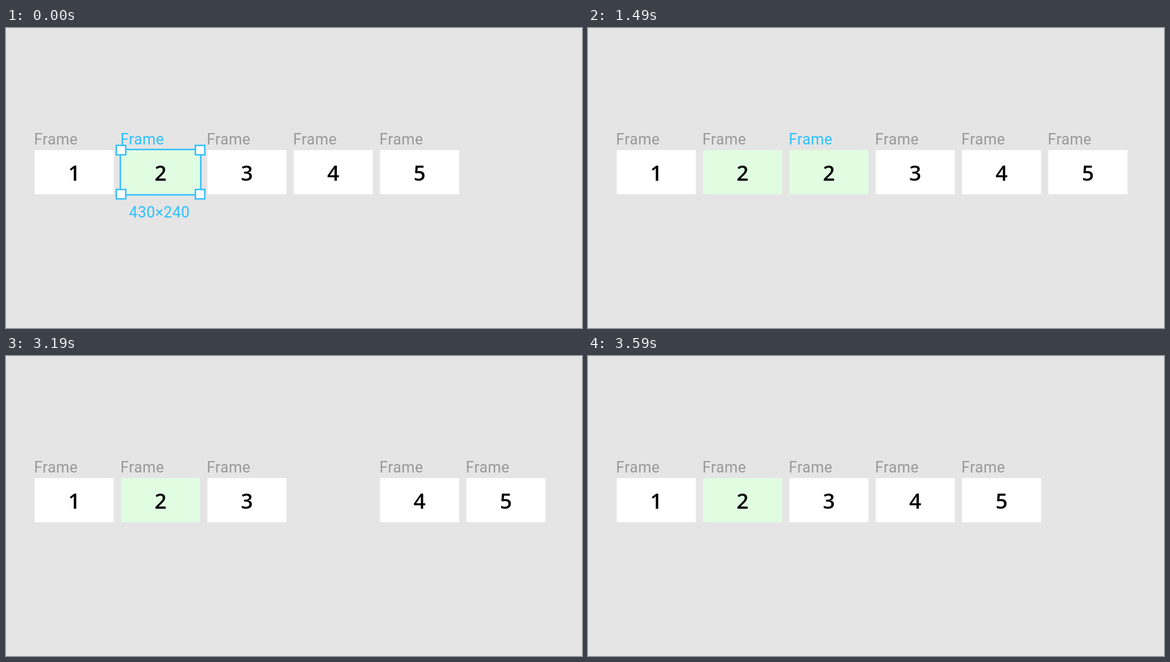
Recreate the animation shown at these times as an HTML page. Size 954 px wide and 497 px high, loop 4450 ms.

```html
<!DOCTYPE html>
<html lang="en">
<head>
<meta charset="utf-8">
<title>Frames</title>
<style>
  html, body { margin: 0; width: 100%; height: 100%; overflow: hidden; background: #e5e5e5; }
  svg { display: block; }
  .label, .size { font: 25px Roboto, sans-serif; letter-spacing: .45px; fill: #999; }
  .digit { font: 600 35px "Open Sans", "Noto Sans", sans-serif; text-anchor: middle; }
  .hot, .size { fill: #30bfff; }
  .line { fill: none; stroke: #30bfff; stroke-width: 2.4; }
  .handle { fill: #fff; }
</style>
</head>
<body>
<svg id="stage" width="954" height="497"></svg>
<script>
const LOOP = 4450, LEFT = 47.5, TOP = 202.3, PITCH = 143, W = 131, H = 73;

// start time, digit in each slot, slot with a blue label, outline shown
const steps = [
  [0, "12345", 1, true],
  [930, "12345"],
  [1010, "12345", 2],
  [1090, "12345"],
  [1170, "12345", 3],
  [1250, "12345"],
  [1330, "12345", 4],
  [1490, "122345", 2],
  [2960, "122345", 2, true],
  [3040, "12 345"],
  [3110, "12 345", 3, true],
  [3190, "123 45"],
  [3270, "123 45", 4],
  [3340, "1234 5"],
  [3420, "1234 5", 5],
  [3510, "12345", 4],
  [3590, "12345"]
];

const slotX = i => LEFT + PITCH * i;
const rect = (x, y, w, h, attrs) =>
  `<rect x="${x}" y="${y}" width="${w}" height="${h}" ${attrs}/>`;
const text = (x, y, name, str) => `<text x="${x}" y="${y}" class="${name}">${str}</text>`;

function card(digit, i, hot) {
  if (digit === " ") return "";
  const x = slotX(i);
  return rect(x, TOP, W, H, `fill="${digit === "2" ? "#e1fde1" : "#fff"}"`) +
    text(x - 1, 192.5, hot ? "label hot" : "label", "Frame") +
    text(x + W / 2, 253, "digit", digit);
}

function outline(i) {
  const x = slotX(i), r = 7.8;
  let out = rect(x - 1.1, TOP - 1.1, W + 2.2, H + 2.2, 'class="line"');
  for (const cx of [x, x + W])
    for (const cy of [TOP, TOP + H])
      out += rect(cx - r, cy - r, 2 * r, 2 * r, 'class="line handle" style="fill:#fff"');
  return out + text(x + 13.2, 313.5, "size", "430×240");
}

const stage = document.getElementById("stage");
const start = performance.now();
let shown;

function draw(now) {
  const t = Math.max(0, now - start) % LOOP;
  const step = steps.findLast(s => s[0] <= t);
  if (step !== shown) {
    shown = step;
    const [, digits, hot, selected] = step;
    stage.innerHTML = [...digits].map((d, i) => card(d, i, i === hot)).join("") +
      (selected ? outline(hot) : "");
  }
  requestAnimationFrame(draw);
}
draw(start);
</script>
</body>
</html>
```
